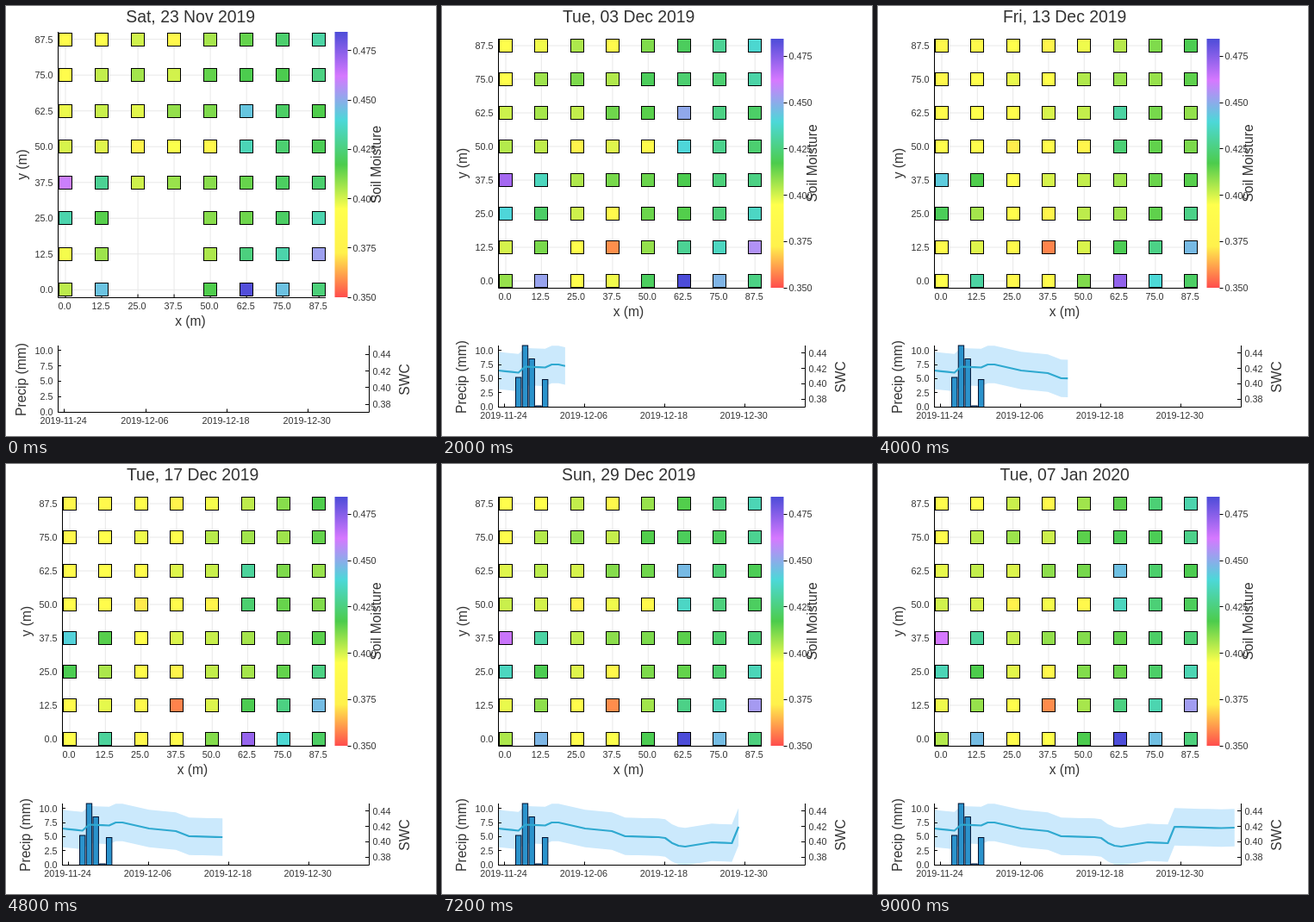
Write an HTML page that moves like this. It is 499 by 499 pixels and loops after 9.2 s.

```html
<!DOCTYPE html>
<html lang="en">
<head>
<meta charset="utf-8">
<title>Soil moisture by day</title>
<style>
html, body { margin: 0; width: 100%; height: 100%; overflow: hidden; background: #fff; }
svg { display: block; width: 499px; height: 499px; font-family: "Liberation Sans", Arial, sans-serif; }
</style>
</head>
<body>
<svg id="stage" viewBox="0 0 499 499"></svg>
<script>
const STEP = 200, DAYS = 46, RIGHT = 371, END = 421;
const stage = document.getElementById('stage');
const COLORS = [[255, 76, 76], [255, 241, 76], [255, 255, 76], [76, 204, 76],
  [76, 216, 216], [214, 120, 255], [76, 76, 216]];
const SPAN = 134.5; // colour range, in thousandths of moisture above 0.350

// Wet and dry patches of the field: column, row from the top, strength.
const patches = [
  [0.3, 4.3, 95], [1, 7, 52], [5, 7, 64], [5, 2.4, 42], [7, 5.7, 36], [6.6, 0, 20], [6, 7, 20],
  [3, 6, -52], [2, 3, -26], [4, 3, -32], [3, 5, -20], [2, 7, -20], [0.2, 0.4, -18], [3, 0, -24]];

// Turning points of the mean line: day, height on the stage.
const turns = [[0, 423], [3, 425.5], [4, 418.5], [7, 419.5], [8, 416], [9, 416], [13, 423],
  [17, 426], [19, 432], [24, 433], [25, 434], [26.5, 442.5], [28, 444], [32, 439], [35, 440],
  [36, 421], [43, 422.5], [45, 422]];

// Tops of the rain bars by day.
const rain = { 3: 431, 4: 394, 5: 409.5, 6: 464, 7: 433.5 };

const clamp = v => Math.min(1, Math.max(0, v));
const mix = (a, b, k) => a + (b - a) * k;
const crisp = v => Math.floor(v) + 0.5;
const rgb = c => `rgb(${c.map(Math.round)})`;
const noise = n => {
  const s = Math.sin(n * 12.9898) * 43758.5453;
  return (s - Math.floor(s)) * 2 - 1;
};

function layout(left, top, base, floor, pad) {
  const x0 = left + 9;
  return {
    left, top, base, floor, x0, dx: (363.2 - x0) / 7,
    y0: base - pad, dy: (base - top - 2 * pad) / 7,
    mid: (top + base) / 2, center: (left + RIGHT) / 2 - 1.3,
    low: (394 + floor) / 2 + 1, day: (END - left) / DAYS
  };
}
const wide = layout(60, 30, 338, 471, 8.7);
const snug = layout(65, 38, 327, 465, 8);

function mean(day) {
  const n = Math.max(1, turns.findIndex(p => p[0] >= day));
  const [a, ya] = turns[n - 1], [b, yb] = turns[n];
  return mix(ya, yb, (day - a) / (b - a));
}

function shade(v) {
  const u = clamp(v / SPAN) * 6, n = Math.min(5, Math.floor(u));
  return rgb(COLORS[n].map((c, j) => mix(c, COLORS[n + 1][j], u - n)));
}

// Wet level of a plot; the lower right of the field loses least as it dries.
function moisture(col, row, day) {
  let wet = 52 + 3.3 * col + 5 * noise(row * 8 + col + 1);
  for (const [x, y, lift] of patches) {
    wet += lift * Math.exp(-((col - x) ** 2 + (row - y) ** 2) / 0.56);
  }
  const dryness = clamp((mean(day) - 418) / 26);
  return wet * (1 - dryness * (0.42 - 0.3 * col * row / 49));
}

function missing(col, row, day) {
  if (day === 0) return row > 4 && (col === 2 || col === 3);
  return day === 5 && row === 0 && col % 4 === 0;
}

function text(s, x, y, size, anchor = 'middle', turn = '') {
  return `<text x="${x}" y="${y}" font-size="${size}" text-anchor="${anchor}" fill="#333"${turn}>${s}</text>`;
}
const tick = (s, x, y, anchor) => text(s, x, y, 10.8, anchor);
const upright = (s, x, y) => text(s, x, y, 15.6, 'middle', ` transform="rotate(-90 ${x} ${y})"`);
const path = (d, stroke = '#000', width = 1) =>
  `<path d="${d}" fill="none" stroke="${stroke}" stroke-width="${width}" stroke-linejoin="round"/>`;

function field(day, g) {
  let grid = '', marks = '', labels = '', cells = '';
  for (let n = 0; n < 8; n++) {
    const x = g.x0 + n * g.dx, y = g.y0 - n * g.dy, s = (n * 12.5).toFixed(1);
    grid += `M${x} ${g.top}V${g.base}M${g.left} ${y}H${RIGHT}`;
    marks += `M${x} ${g.base}v-3.5M${g.left} ${y}h3.5`;
    labels += tick(s, x - 1, g.base + 13.5) + tick(s, g.left - 5.5, y + 4, 'end');
    for (let col = 0; col < 8; col++) {
      const row = 7 - n;
      if (missing(col, row, day)) continue;
      const left = Math.round(g.x0 + col * g.dx) - 7.5, top = Math.round(y) - 7.5;
      cells += `<rect x="${left}" y="${top}" width="15" height="15" fill="${shade(moisture(col, row, day))}" stroke="#000"/>`;
    }
  }
  return path(grid, '#e8e8e8') +
    path(`M${g.left + 0.5} ${g.top}V${g.base + 0.5}H${RIGHT}` + marks) + labels + cells +
    text('x (m)', g.center - 0.2, g.base + 32.5, 15.6) + upright('y (m)', g.left - 36.5, g.mid);
}

function scale(g) {
  const height = g.base - g.top;
  let out = `<rect x="381.5" y="${g.top}" width="15" height="${height}" fill="url(#ramp)"/>`;
  for (let n = 0; n < 6; n++) {
    const y = g.base - n * height * 25 / SPAN;
    out += path(`M396.5 ${crisp(y)}h4`) + tick((0.35 + n * 0.025).toFixed(3), 402.5, y + 4, 'start');
  }
  return out + upright('Soil Moisture', 435, g.mid);
}

function trend(day, g) {
  const px = d => g.left + 0.5 + d * g.day;
  const pts = Array.from({ length: day + 1 }, (_, d) => [px(d), mean(d)]);
  const run = (list, off) => list.map(([x, y]) => `${x} ${Math.min(g.floor, y + off)}`).join('L');
  const line = run(pts, 0);
  let out = `<path d="M${run(pts, -21.7)}L${run(pts.reverse(), 21.7)}Z" fill="#cbe9fc"/>`;
  for (const d in rain) {
    if (d > day) continue;
    out += `<rect x="${px(+d) - 3.2}" y="${rain[d]}" width="6.4" height="${g.floor + 0.5 - rain[d]}" fill="#2b93cc" stroke="#001030"/>`;
  }
  return out + path('M' + line, '#2fa9d0', 2.2);
}

function history(day, g) {
  let out = day > 0 ? trend(day, g) : '', marks = '';
  for (let n = 0; n < 5; n++) {
    const y = mix(g.floor, 399.8, n / 4);
    marks += `M${g.left} ${crisp(y)}h4`;
    out += tick((n * 2.5).toFixed(1), g.left - 5.5, y + 4, 'end');
  }
  for (let n = 0; n < 4; n++) {
    const y = g.floor - 8.7 - n * (g.floor - 393.5) / 4;
    const x = g.left + (1 + 12 * n) * g.day;
    const date = new Date(Date.UTC(2019, 10, 24 + 12 * n)).toISOString().slice(0, 10);
    marks += `M${END} ${crisp(y)}h-4M${crisp(x)} ${g.floor}v-3.5`;
    out += tick((0.38 + n * 0.02).toFixed(2), 425.5, y + 4, 'start') +
      tick(date, x - 1.2, g.floor + 13.5);
  }
  return out + path(`M${g.left + 0.5} 394V${g.floor + 0.5}H${END + 0.5}V394` + marks) +
    upright('Precip (mm)', g.left - 37, g.low) + upright('SWC', 468, g.low);
}

function heading(day) {
  const date = new Date(Date.UTC(2019, 10, 23 + day));
  const part = options => date.toLocaleString('en-US', { timeZone: 'UTC', ...options });
  return `${part({ weekday: 'short' })}, ${part({ day: '2-digit' })} ` +
    `${part({ month: 'short' })} ${date.getUTCFullYear()}`;
}

const ramp = '<defs><linearGradient id="ramp" x1="0" y1="1" x2="0" y2="0">' +
  COLORS.map((c, i) => `<stop offset="${i / 6}" stop-color="${rgb(c)}"/>`).join('') +
  '</linearGradient></defs>';

let shown = -1;
function draw(ms) {
  const day = Math.floor(ms / STEP) % DAYS;
  if (day === shown) return;
  shown = day;
  const g = day === 0 ? wide : snug;
  stage.innerHTML = ramp + text(heading(day), g.center, 19, 19.4) +
    field(day, g) + scale(g) + history(day, g);
}

const origin = performance.now();
function loop() {
  draw(performance.now() - origin);
  requestAnimationFrame(loop);
}
loop();
</script>
</body>
</html>
```
